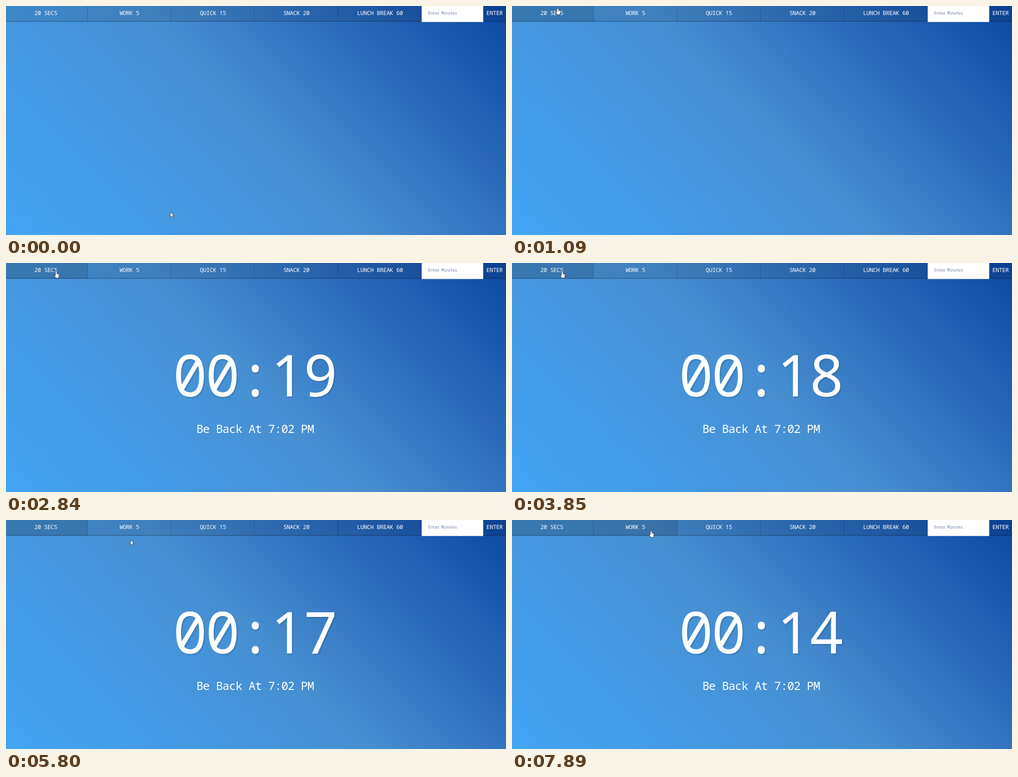
Recreate the animation shown at these times as an HTML page with a canvas. Size 1103 by 508 pixels, loop 8 s.

```html
<!DOCTYPE html>
<html lang="en">
<head>
<meta charset="utf-8">
<title>Break timer</title>
<style>
  html, body { margin: 0; width: 100%; height: 100%; overflow: hidden; background: #478ed1; }
  canvas { display: block; width: 1103px; height: 508px; }
</style>
</head>
<body>
<canvas id="stage" width="1103" height="508"></canvas>
<script>
const W = 1103, H = 508, LOOP = 8000, STEP = 70;
const BAR = 35, FIRST = 180, CELL = 184.3;
const HOVER_AT = 1020, TIMER_AT = 1834, SECOND = 1002;
const ctx = document.getElementById('stage').getContext('2d');
const labels = ['20 SECS', 'WORK 5', 'QUICK 15', 'SNACK 20', 'LUNCH BREAK 60'];

// Pointer legs: start time, steps, end point, sideways bow relative to length
const home = { x: 363, y: 458 };
const legs = [
  { at: 70, n: 11, x: 93, y: 8, bow: 0.12 },
  { at: HOVER_AT, n: 6, x: 110, y: 14, bow: -0.35 },
  { at: 1640, n: 1, x: 104.5, y: 11, bow: 0 },
  { at: 1840, n: 1, x: 110.5, y: 19, bow: 0 },
  { at: 5370, n: 7, x: 275, y: 45, bow: 0.15 },
  { at: 5860, n: 5, x: 296, y: 30, bow: 0 },
  { at: 6540, n: 3, x: 302, y: 26, bow: 0 },
  { at: 6880, n: 3, x: 306.5, y: 24, bow: 0 }
];

const arrow = new Path2D('M0 0V9.8L2.2 7.7L3.8 11.5L5.3 10.9L3.7 7.1H6.7Z');
const hand = new Path2D('M-.9 9V1.6Q.4-.4 1.7 1.6V5.2L5 6Q6.4 6.4 6.2 8.5L4.8 14H-.2L-3 9.8Q-3.4 7.6-.9 9Z');

// 45 degree gradient through the middle of the stage
const reach = (W + H) / 4;
const sky = ctx.createLinearGradient(W / 2 - reach, H / 2 + reach, W / 2 + reach, H / 2 - reach);
['#42a5f5', '#478ed1', '#0d47a1'].forEach((c, i) => sky.addColorStop(i / 2, c));

function pointer(t) {
  let pos = home;
  for (const leg of legs) {
    if (t < leg.at) break;
    const u = Math.min(1, (Math.floor((t - leg.at) / STEP) + 1) / leg.n);
    const dx = leg.x - pos.x, dy = leg.y - pos.y;
    const side = leg.bow * Math.sin(Math.PI * u);
    pos = { x: pos.x + dx * u - dy * side, y: pos.y + dy * u + dx * side };
  }
  return pos;
}

function shade(x, y, w, h, alpha) {
  ctx.fillStyle = `rgba(0,0,0,${alpha})`;
  ctx.fillRect(x, y, w, h);
}

// Monospaced line centred on cx; digits but the slashed zero come from the sans, whose 1 has no foot
function line(str, cx, base, pitch, color = '#fff') {
  ctx.textAlign = 'center';
  ctx.fillStyle = color;
  [...str].forEach((ch, i) => {
    const face = /[1-9]/.test(ch) ? '"Noto Sans", sans-serif' : '"Noto Sans Mono", monospace';
    ctx.font = `${pitch * 1.77}px ${face}`;
    ctx.fillText(ch, cx + (i + 0.5 - str.length / 2) * pitch, base);
  });
}

function drawBar(hot) {
  shade(0, 0, W, BAR, 0.1);
  labels.forEach((str, i) => {
    const right = FIRST + CELL * i, left = Math.max(0, right - CELL);
    if (hot[i]) shade(left, 0, right - left, BAR, 0.11);
    shade(Math.floor(right) - 0.5, 0, 1, BAR - 1, 0.24);
    line(str, 88 + CELL * i, 19.6, 7.2);
  });
  shade(0, BAR - 2, W, 2, 0.2);
  ctx.fillStyle = '#fff';
  ctx.fillRect(917, 0, 135.7, BAR + 0.5);
  line('Enter Minutes', 963.2, 19, 4.88, '#6c7cae');
  line('ENTER', 1078, 19.6, 7.2);
}

function drawTimer(left) {
  ctx.save();
  ctx.shadowColor = 'rgba(0,0,0,.12)';
  ctx.shadowOffsetX = ctx.shadowOffsetY = 2.5;
  ctx.shadowBlur = 2;
  line('00:' + left, 550, 296, 72);
  ctx.restore();
  line('Be Back At 7:02 PM', 550, 377, 14.4);
}

function drawPointer({ x, y }, shape) {
  ctx.save();
  ctx.translate(x, y);
  ctx.lineJoin = 'round';
  ctx.lineWidth = 1.6;
  ctx.strokeStyle = '#26303c';
  ctx.stroke(shape);
  ctx.fillStyle = '#fff';
  ctx.fill(shape);
  ctx.restore();
}

function draw(t) {
  const pos = pointer(t);
  const active = t >= HOVER_AT, over = active && pos.y < BAR;
  ctx.fillStyle = sky;
  ctx.fillRect(0, 0, W, H);
  drawBar([active, over && pos.x > FIRST]);
  if (t >= TIMER_AT) drawTimer(20 - Math.floor((t - TIMER_AT) / SECOND));
  drawPointer(pos, over ? hand : arrow);
}

const began = performance.now();
function loop() {
  draw((performance.now() - began) % LOOP);
  requestAnimationFrame(loop);
}
loop();
</script>
</body>
</html>
```
